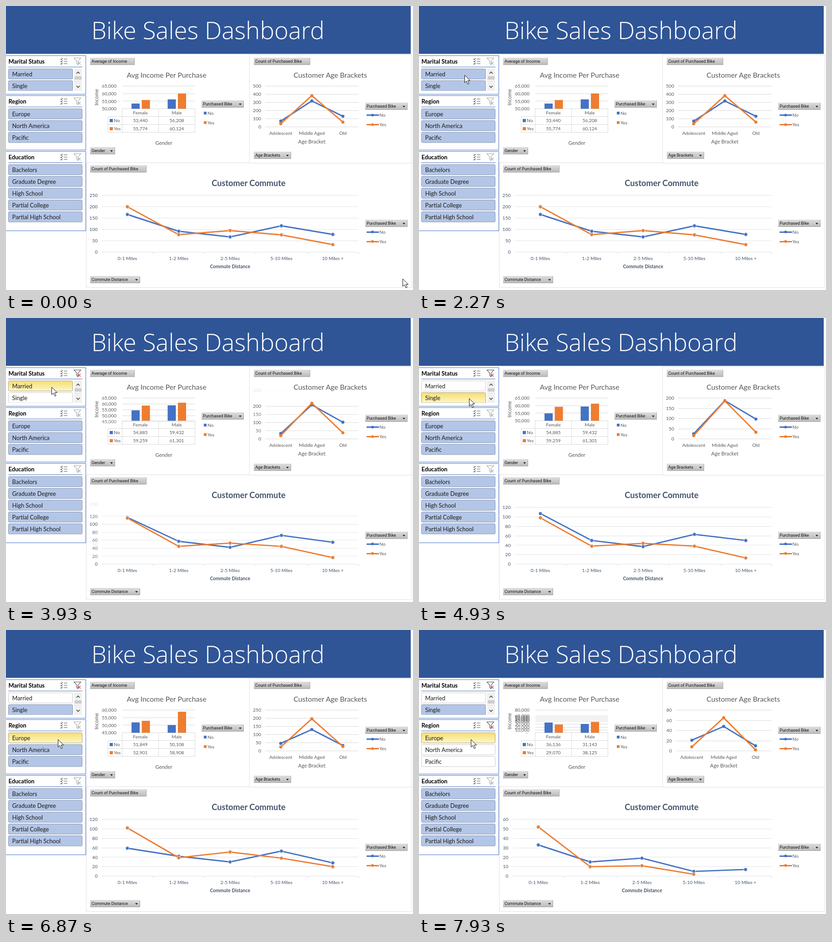
Animation of 895x626 px, one loop 8000 ms. Source, as an HTML page:

```html
<!DOCTYPE html>
<html lang="en">
<head>
<meta charset="utf-8">
<title>Bike Sales Dashboard</title>
<style>
html, body { margin: 0; width: 100%; height: 100%; overflow: hidden; background: #fff; }
svg { display: block; font-family: Lato, sans-serif; }
line, .crisp { shape-rendering: crispEdges; }
</style>
</head>
<body>
<svg width="895" height="626" viewBox="0 0 895 626">
  <defs>
    <linearGradient id="field" x2="0" y2="1">
      <stop stop-color="#dedede"/><stop offset="1" stop-color="#b9b9b9"/>
    </linearGradient>
    <linearGradient id="hover" x2="0" y2="1">
      <stop stop-color="#f7df6b"/><stop offset="1" stop-color="#fdf6cd"/>
    </linearGradient>
  </defs>
  <g id="fixed"></g>
  <g id="live"></g>
</svg>
<script>
const BLUE = '#4472c4', ORANGE = '#ed7d31', GREY = '#595959', SLATE = '#44546a', GRID = '#d9d9d9';
const COLORS = [BLUE, ORANGE];

// Axis entries are [low, high, step]; "wide" is the axis passed through on the way to "axis".
const views = [
  { income: [[53440, 56208], [55774, 60124]], axis: [50e3, 65e3, 5e3],
    age: [[71, 318, 130], [39, 383, 59]], ageAxis: [0, 500, 100],
    trip: [[166, 92, 67, 116, 78], [200, 77, 95, 76, 33]], tripAxis: [0, 250, 50], indent: 0 },
  { income: [[54885, 59432], [59259, 61301]], axis: [50e3, 65e3, 5e3], wide: [45e3, 65e3, 5e3],
    age: [[25, 187, 97], [16, 186, 33]], ageAxis: [0, 200, 50],
    trip: [[107, 50, 37, 63, 50], [98, 38, 44, 38, 13]], tripAxis: [0, 120, 20], indent: 0 },
  { income: [[51849, 50108], [52901, 58908]], axis: [45e3, 60e3, 5e3], wide: [0, 80e3, 20e3],
    age: [[46, 131, 33], [24, 197, 27]], ageAxis: [0, 250, 50],
    trip: [[59, 42, 30, 53, 28], [102, 39, 51, 38, 20]], tripAxis: [0, 120, 20], indent: 0 },
  { income: [[36136, 31143], [29070, 38125]], axis: [0, 40e3, 10e3], wide: [0, 80e3, 20e3],
    age: [[21, 48, 10], [8, 65, 2]], ageAxis: [0, 80, 20],
    trip: [[33, 15, 19, 5, 7], [52, 10, 11, 2, null]], tripAxis: [0, 60, 10], indent: 5 }
];
// Start and end of the data change, then of the income axis refit.
const changes = [[3370, 4130, 4150, 4600], [4940, 5670, 5750, 6130], [7220, 7930, 8000, 8400]];
const cursorKeys = [
  [70, 872, 601], [870, 147, 273], [1000, 140, 271], [1330, 171, 230], [1470, 162, 232],
  [2270, 100, 152], [4929, 100, 152], [4930, 110, 177], [6340, 110, 177], [6870, 114, 241]
];

const mix = (a, b, p) => a + (b - a) * p;
const progress = (t, a, b) => {
  const p = Math.min(1, Math.max(0, (t - a) / (b - a)));
  return p * p * (3 - 2 * p);
};
const ticks = ([low, high, step]) =>
  Array.from({ length: Math.round((high - low) / step) + 1 }, (_, i) => low + i * step);

const text = (x, y, s, { size = 10.3, fill = GREY, anchor = 'middle', more = '' } = {}) =>
  `<text x="${x}" y="${y}" dy=".36em" font-size="${size}" fill="${fill}" text-anchor="${anchor}" ${more}>${s}</text>`;
const line = (x1, y1, x2, y2, stroke = GRID, more = '') =>
  `<line x1="${x1}" y1="${y1}" x2="${x2}" y2="${y2}" stroke="${stroke}" ${more}/>`;
const rect = (x, y, w, h, fill, more = '') =>
  `<rect x="${x}" y="${y}" width="${w}" height="${h}" fill="${fill}" ${more}/>`;
const path = (d, stroke, more = '') => `<path d="${d}" fill="none" stroke="${stroke}" ${more}/>`;

function field(x, y, w, label, menu) {
  return rect(x, y, w, 16, 'url(#field)') +
    path(`M${x} ${y + 15.5}h${w - .5}v-15`, '#a9a9a9') +
    text(x + 3, y + 8, label, { size: 9.4, fill: '#111', anchor: 'start', more: 'font-family="Roboto, sans-serif"' }) +
    (menu ? `<path d="M${x + w - 11} ${y + 7}h6l-3 3.5z" fill="#222"/>` : '');
}

function panel(y, h, title) {
  const rows = [0, 5, 10].map(d =>
    path(`M120 ${y + 8 + d}l1.5 1.5l3-3.5M127 ${y + 8 + d}h8`, '#555', 'stroke-width="1.2"')).join('');
  return rect(-1, y + .5, 176, h, '#fff', `stroke="${BLUE}" class="crisp"`) +
    text(5.5, y + 13, title, { size: 12.8, fill: '#000', anchor: 'start', more: 'font-weight="700"' }) +
    rows + line(5, y + 25.5, 168, y + 25.5, BLUE);
}

function funnel(y, active) {
  return path(`M149.5 ${y + 5.5}h15l-6 7v8l-3-2.500v-5.500z`, active ? '#444' : '#a6a6a6', 'stroke-width="1.1"') +
    path(`M158 ${y + 14}l6 6m0-6l-6 6`, active ? '#e0393e' : '#b0b0b0', 'stroke-width="1.3"');
}

function item(y, label, look = 'on', w = 162) {
  const [fill, edge] = { on: ['#b4c6e7', '#8795ae'], off: ['#fff', '#c8c8c8'], hover: ['url(#hover)', '#aaa183'] }[look];
  return rect(5.5, y + .5, w, 22.5, fill, `rx="2" stroke="${edge}"`) +
    text(13.5, y + 12, label, { size: 12.8, fill: '#1a1a1a', anchor: 'start' });
}

function lineLegend(x, y) {
  return COLORS.map((c, i) => line(x, y + i * 21, x + 27, y + i * 21, c, 'stroke-width="3"') +
    `<circle cx="${x + 13}" cy="${y + i * 21}" r="3" fill="${c}"/>` +
    text(x + 28, y + i * 21, ['No', 'Yes'][i], { anchor: 'start' })).join('');
}

function fixedParts() {
  const dark = { size: 15.8 }, axisTitle = { size: 11.4 };
  return rect(0, 0, 890, 105.5, '#2f5597') +
    text(444, 54, 'Bike Sales Dashboard', { size: 53, fill: '#fff', more: 'font-family="Open Sans, sans-serif" font-weight="300"' }) +
    path('M535.5 107.500V346.500M176.500 345.500H535M535 346.500H892.500M176.500 345V620.500H892.500V107.500H535', '#e0e0e0', 'class="crisp"') +
    panel(109, 85, 'Marital Status') + panel(197, 120, 'Region') + panel(320, 175, 'Education') +
    funnel(320, false) +
    ['Bachelors', 'Graduate Degree', 'High School', 'Partial College', 'Partial High School']
      .map((s, i) => item(Math.round(348.6 + i * 26.2), s)).join('') +
    rect(150, 138, 17, 49, '#f0f0f0') + rect(151, 155, 15, 7, '#cdcdcd') +
    path('M155 149l3.500-3.500l3.500 3.500M155 176l3.500 3.500l3.500-3.500', '#444', 'stroke-width="1.6"') +
    field(185, 114, 98, 'Average of Income') + field(545, 114, 124, 'Count of Purchased Bike') +
    field(185, 351, 124, 'Count of Purchased Bike') + field(185, 311, 55, 'Gender', true) +
    field(545, 321, 82, 'Age Brackets', true) + field(185, 595, 110, 'Commute Distance', true) +
    field(430, 208, 93, 'Purchased Bike', true) + field(790, 213, 93, 'Purchased Bike', true) +
    field(790, 471, 93, 'Purchased Bike', true) +
    text(353, 152, 'Avg Income Per Purchase', dark) + text(713, 152, 'Customer Age Brackets', dark) +
    text(533.5, 390, 'Customer Commute', { size: 18.2, fill: SLATE, more: 'font-weight="700"' }) +
    text(347, 302, 'Gender', axisTitle) +
    text(0, 0, 'Income', { size: 11.4, more: 'transform="translate(199 201) rotate(-90)"' }) +
    path('M255.500 226.500H415.500V278.500H224.500V243.500H415.500M224.500 261.500H415.500M255.500 226V278M335.500 226V278', GRID, 'class="crisp"') +
    text(295.5, 235, 'Female') + text(375.5, 235, 'Male') +
    COLORS.map((c, i) => rect(228, 249 + 18 * i, 7, 7, c) +
      text(237, 252.5 + 18 * i, ['No', 'Yes'][i], { anchor: 'start' }) +
      rect(435, 233 + 21 * i, 6, 6, c) +
      text(443, 236 + 21 * i, ['No', 'Yes'][i], { anchor: 'start' })).join('') +
    lineLegend(793, 240.5) + lineLegend(793, 498);
}

function incomeChart(from, to, p, refit) {
  const wide = to.wide || to.axis;
  const edge = i => mix(mix(from.axis[i], wide[i], p), to.axis[i], refit);
  const low = edge(0), high = edge(1);
  const yOf = v => 226.5 - 50 * (v - low) / (high - low);
  const old = ticks(from.axis), final = ticks(to.axis);
  let out = '';
  for (const v of new Set([...old, ...ticks(wide), ...final])) {
    const y = yOf(v);
    const alpha = (old.includes(v) ? 1 : p) * (final.includes(v) ? 1 : 1 - refit);
    if (alpha < .01 || y < 108 || y > 312) continue;
    out += `<g opacity="${alpha}">` + line(256, y, 416, y) +
      text(v ? 243 : 239, y, v ? v.toLocaleString('en-US') : '-', { anchor: 'end' }) + '</g>';
  }
  to.income.forEach((row, s) => row.forEach((v, i) => {
    const y = yOf(mix(from.income[s][i], v, p));
    const shown = p > 0 ? v : from.income[s][i];
    out += rect(276 + 79.5 * i + 22.5 * s, y, 18, Math.max(0, 226.5 - y), COLORS[s]) +
      text(295.5 + 80 * i, 252.5 + 18 * s, shown.toLocaleString('en-US'));
  }));
  return out;
}

function lineChart(from, to, p, o) {
  const left = o.left - mix(from.indent, to.indent, p), width = 775 - left;
  const high = mix(from[o.axis][1], to[o.axis][1], p);
  const yOf = v => o.base - o.height * v / high;
  const xOf = i => left + (i + .5) * width / o.names.length;
  const old = ticks(from[o.axis]), final = ticks(to[o.axis]);
  let out = '';
  for (const v of new Set([...old, ...final])) {
    const y = yOf(v), alpha = (old.includes(v) ? 1 : p) * (final.includes(v) ? 1 : 1 - p);
    if (alpha < .01 || y < o.base - o.height - 20) continue;
    out += `<g opacity="${alpha}">` + line(left, y, 775, y, o.grid) +
      text(left - 9, y, v, { anchor: 'end', fill: o.ink }) + '</g>';
  }
  o.names.forEach((s, i) => {
    out += text(xOf(i), o.base + 14, s, { fill: o.ink });
    if (o.halo) out += line(left + (i + 1) * width / 5, o.base, left + (i + 1) * width / 5, o.base + 4);
  });
  out += text(left + width / 2, o.base + 32, o.title, o.titleStyle);
  to[o.data].forEach((row, s) => {
    const points = row.map((v, i) => v === null && p > 0 ? null : [xOf(i), yOf(mix(from[o.data][s][i], v, p))])
      .filter(Boolean);
    out += path('M' + points.join('L'), COLORS[s], 'stroke-width="2.9" stroke-linejoin="round" stroke-linecap="round"') +
      points.map(([x, y]) => `<circle cx="${x}" cy="${y}" r="${o.halo ? 3.9 : 3.4}" fill="${COLORS[s]}" ${o.halo ? 'stroke="#e4e9f2"' : ''}/>`).join('');
  });
  return out;
}

const ageOptions = {
  data: 'age', axis: 'ageAxis', left: 570, base: 266.5, height: 90, ink: GREY, grid: GRID,
  names: ['Adolescent', 'Middle Aged', 'Old'], title: 'Age Bracket', titleStyle: { size: 11.3 }
};
const tripOptions = {
  data: 'trip', axis: 'tripAxis', left: 210.5, base: 542.5, height: 125, ink: SLATE, grid: '#dfe3e8', halo: true,
  names: ['0-1 Miles', '1-2 Miles', '2-5 Miles', '5-10 Miles', '10 Miles +'],
  title: 'Commute Distance', titleStyle: { size: 10.4, fill: SLATE, more: 'font-weight="700"' }
};

function slicers(t) {
  const married = t < 2400 ? 'on' : t < 4930 ? 'hover' : 'off';
  const single = t < 3330 ? 'on' : t < 4930 ? 'off' : t < 6500 ? 'hover' : 'on';
  const region = t < 7200 ? 'on' : 'off';
  return item(138, 'Married', married, 141) + item(164, 'Single', single, 141) + rect(3, 187, 146, 6, '#fff') +
    item(226, 'Europe', t < 6780 ? 'on' : 'hover') + item(252, 'North America', region) + item(278, 'Pacific', region) +
    funnel(109, t >= 3390) + funnel(197, t >= 7260);
}

function cursor(t) {
  const next = cursorKeys.findIndex(k => k[0] > t);
  const b = cursorKeys[next < 0 ? cursorKeys.length - 1 : next];
  const a = next > 0 ? cursorKeys[next - 1] : b;
  const p = a === b ? 1 : progress(t, a[0], b[0]);
  return `<path transform="translate(${mix(a[1], b[1], p)} ${mix(a[2], b[2], p)})"
    d="M.5 .5V17L4.300 13.500L7.300 20.300L10 19L7.100 12.500H12.500Z" fill="#fff" stroke="#111"/>`;
}

function draw() {
  const t = performance.now() % 8000;
  const step = changes.findLastIndex(c => t >= c[0]);
  const [a, b, c, d] = changes[step] || [0, 1, 0, 1];
  const from = views[Math.max(0, step)], to = views[step + 1];
  const p = progress(t, a, b), refit = progress(t, c, d);
  live.innerHTML = slicers(t) + incomeChart(from, to, p, refit) +
    lineChart(from, to, p, ageOptions) + lineChart(from, to, p, tripOptions) + cursor(t);
  requestAnimationFrame(draw);
}

const live = document.getElementById('live');
document.getElementById('fixed').innerHTML = fixedParts();
draw();
</script>
</body>
</html>
```
